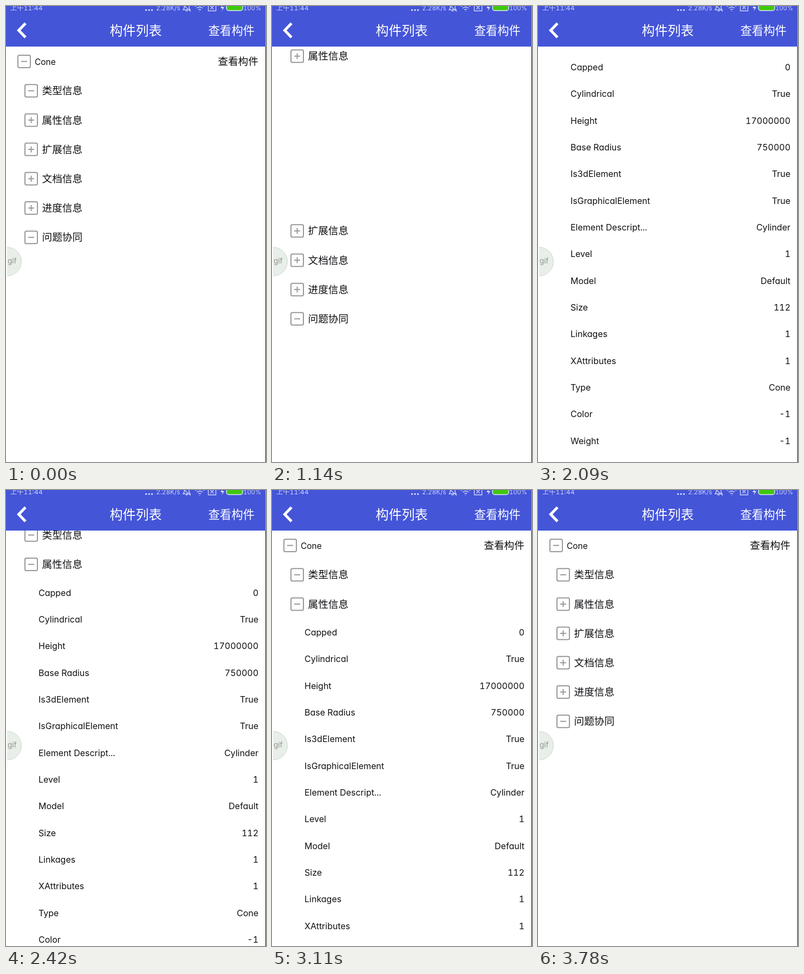
These frames come from a looping animation (480x843 px, 4180 ms). An HTML page:

```html
<!DOCTYPE html>
<html lang="zh">
<head>
<meta charset="utf-8">
<style>
  html, body { margin: 0; width: 100%; height: 100%; overflow: hidden; background: #fff; }
  svg { display: block; width: 480px; height: 843px; }
  text { font-family: Inter, "Noto Sans CJK SC", "Noto Sans CJK", sans-serif; font-feature-settings: "tnum", "cv11"; }
</style>
</head>
<body>
<svg id="stage" viewBox="0 0 480 843">
  <g id="list"></g>
  <path d="M2 446A26.5 26.5 0 0 1 2 499Z" fill="#e8eee8"/>
  <path d="M2 446A26.5 26.5 0 0 1 2 499" fill="none" stroke="#cfd6cf"/>
  <path d="M479.5 75V843" stroke="#111"/>
  <rect width="479.5" height="75" fill="#4455d8"/>
  <path d="M36 32L23.5 45L36 58" fill="none" stroke="#fff" stroke-width="5"/>
  <g id="status" fill="none" stroke="#cdd2f7" stroke-width="1.4">
    <path d="M257 7.5h3M262.500 7.500h3M268 7.500h3" stroke-width="3"/>
    <path d="M329 0V4L327 7H340L338 4V0M331.500 9H335.500M327 -2L341 10"/>
    <path d="M349 1Q357.500 -5 366 1M352 4Q357.500 0 363 4M355 7Q357.500 5 360 7M357.500 9v1"/>
    <path d="M373.500 -3V9H387.500V-3M377.500 0L383.500 6M383.500 0L377.500 6"/>
    <path d="M401 -3L396 4H400L398 10L403 2H399Z" fill="#e4e7fc" stroke="none"/>
    <rect x="407" y="-4" width="30" height="12.500" rx="4" fill="#3fc80c" stroke="#e4e7fc"/>
  </g>
  <g id="labels"></g>
</svg>
<script>
const LOOP = 4180, GAP = 789, STEP = 49.33;
const $ = id => document.getElementById(id);
const list = $('list'), labels = $('labels');

function make(parent, tag, attrs, content) {
  const el = document.createElementNS('http://www.w3.org/2000/svg', tag);
  for (const k in attrs) el.setAttribute(k, attrs[k]);
  if (content) el.textContent = content;
  parent.appendChild(el);
  return el;
}

// y is the optical middle of the line
function label(parent, x, y, size, content, anchor = 'start', fill = '#101014') {
  return make(parent, 'text', { x, y: y + size * 0.36, 'font-size': size, 'text-anchor': anchor, fill }, content);
}

function toggle(parent, x, y, open) {
  make(parent, 'rect', { x: x - 11.5, y: y - 11.5, width: 23, height: 23, rx: 2.5, fill: 'none', stroke: '#9b979b', 'stroke-width': 2 });
  make(parent, 'path', { d: `M${x - 5.5} ${y}h11`, stroke: '#9b979b', 'stroke-width': 2 });
  const bar = make(parent, 'path', { d: `M${x} ${y - 5.5}v11`, stroke: '#9b979b', 'stroke-width': 2 });
  bar.style.display = open ? 'none' : '';
  return bar;
}

const upper = make(list, 'g'), items = make(list, 'g'), lower = make(list, 'g');

toggle(upper, 33.5, 102.5, true);
label(upper, 53, 103, 15.5, 'Cone');
label(upper, 466, 102, 18.7, '查看构件', 'end');

let propBar;
['类型信息', '属性信息', '扩展信息', '文档信息', '进度信息', '问题协同'].forEach((name, i) => {
  const parent = i < 2 ? upper : lower, y = 156.7 + i * 54.2;
  const bar = toggle(parent, 46.5, y, i === 0 || i === 5);
  if (i === 1) propBar = bar;
  label(parent, 66.5, y, 18.7, name);
});

[
  ['Capped', '0'], ['Cylindrical', 'True'], ['Height', '17000000'], ['Base Radius', '750000'],
  ['Is3dElement', 'True'], ['IsGraphicalElement', 'True'], ['Element Descript...', 'Cylinder'],
  ['Level', '1'], ['Model', 'Default'], ['Size', '112'], ['Linkages', '1'], ['XAttributes', '1'],
  ['Type', 'Cone'], ['Color', '-1'], ['Weight', '-1'], ['Style', '0']
].forEach(([key, value], i) => {
  const y = 263.3 + i * STEP;
  label(items, 60, y, 16, key);
  label(items, 466, y, 16, value, 'end');
});

label(labels, 239.5, 45, 24, '构件列表', 'middle', '#fff');
label(labels, 459, 45, 21.4, '查看构件', 'end', '#fff');
label(labels, 8, 3.5, 12.3, '上午11:44', 'start', '#cdd2f7');
label(labels, 277, 3.5, 11.8, '2.28K/s', 'start', '#cdd2f7');
label(labels, 471, 3.5, 11.3, '100%', 'end', '#cdd2f7');
label(labels, 3, 471, 13.5, 'gif', 'start', '#8f938f');

// The screen repaints in short bursts: [first, last, steps]
const ticks = [0];
[[640, 1140, 6], [1200, 1400, 3], [1690, 1690, 1], [2090, 2420, 5], [2620, 3110, 6], [3210, 3690, 6], [3780, 3780, 1]]
  .forEach(([from, to, n]) => {
    for (let i = 0; i < n; i++) ticks.push(n > 1 ? from + (to - from) * i / (n - 1) : from);
  });

const part = (t, from, to) => Math.min(1, Math.max(0, (t - from) / (to - from)));
const easeOut = p => 1 - (1 - p) ** 2;
const easeInOut = p => p < 0.5 ? 4 * p ** 3 : 1 - 4 * (1 - p) ** 3;
const mix = (a, b, p) => a + (b - a) * p;

function scrollAt(t) {
  if (t < 2090) return 162 * easeOut(part(t, 900, 1400));
  if (t < 2600) return mix(150, 73.4, part(t, 2090, 2420));
  return mix(73.4, 0, easeOut(part(t, 2580, 3110)));
}

function gapAt(t) {
  return GAP * (easeInOut(part(t, 920, 1420)) - easeInOut(part(t, 3280, 3780)));
}

const shift = (el, y) => el.setAttribute('transform', `translate(0 ${y.toFixed(2)})`);

function draw(now) {
  const clock = (now - start + LOOP) % LOOP;
  const t = ticks.reduce((last, tick) => tick <= clock + 0.01 ? tick : last, 0);
  shift(list, -scrollAt(t));
  shift(lower, gapAt(t));
  items.style.display = t >= 1690 && t < 3300 ? '' : 'none';
  propBar.style.display = t >= 1400 && t < 3780 ? 'none' : '';
}

const start = performance.now();
function frame() {
  draw(performance.now());
  requestAnimationFrame(frame);
}
frame();
</script>
</body>
</html>
```
